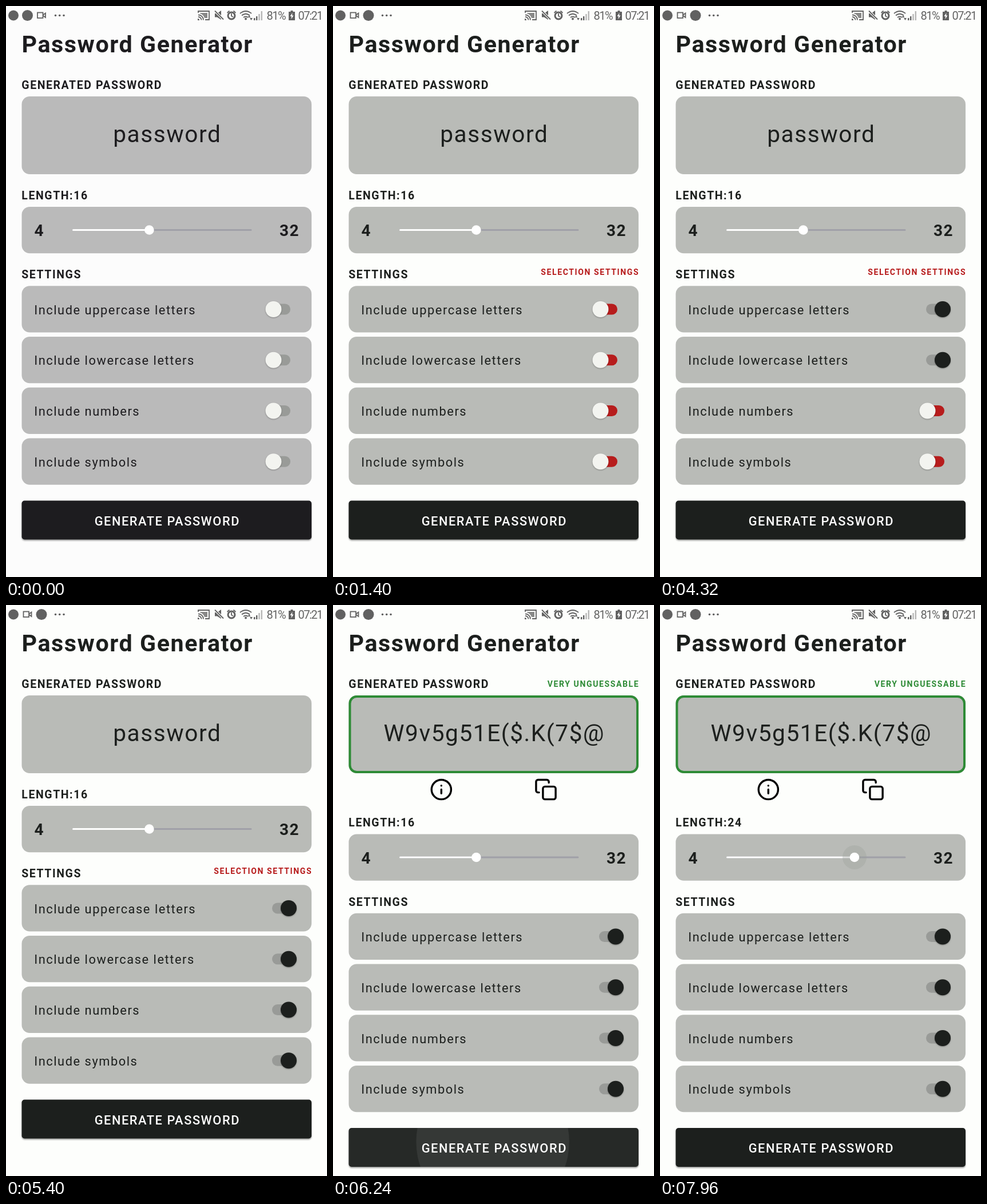
Write an HTML page that moves like this. It is 561x998 px and loops after 8 s.

```html
<!DOCTYPE html>
<html lang="en">
<head>
<meta charset="utf-8">
<title>Password Generator</title>
<style>
  html, body { margin: 0; width: 100%; height: 100%; overflow: hidden; background: #fdfefc; }
  svg { display: block; width: 100vw; height: 100vh; font-family: Roboto, "Liberation Sans", sans-serif; }
  text { fill: var(--ink); letter-spacing: 1.56px; white-space: pre; }
  .page { fill: var(--page); }
  .card { fill: var(--card); }
  .title { font-size: 41.2px; font-weight: 700; }
  .value { font-size: 40.6px; text-anchor: middle; }
  .head { font-size: 19.5px; font-weight: 700; }
  .note { font-size: 14.1px; font-weight: 700; text-anchor: end; }
  .limit { font-size: 28px; font-weight: 700; }
  .option { font-size: 21.8px; }
  .action { font-size: 21.8px; font-weight: 500; fill: #fff; text-anchor: middle; }
  .clock { font-size: 20px; letter-spacing: -1.5px; fill: #636363; }
  .line { fill: none; stroke: #000; stroke-width: 2; stroke-linecap: round; stroke-linejoin: round; }
  .status { fill: #616161; stroke: none; }
  .status .thin { fill: none; stroke: #616161; stroke-width: 1.8; }
  .raised { filter: drop-shadow(0 2px 1.3px rgba(0, 0, 0, .36)); }
  .thumb { filter: drop-shadow(0 1.5px 1px rgba(0, 0, 0, .3)); }
</style>
</head>
<body>
<svg id="stage" viewBox="0 0 561 998" preserveAspectRatio="none">
  <defs>
    <clipPath id="buttonClip"><rect x="27.5" y="864.6" width="506.5" height="67.8" rx="5"/></clipPath>
  </defs>
  <rect class="page" width="561" height="998"/>

  <g class="status">
    <circle cx="13" cy="16.5" r="9"/>
    <circle id="badge" cy="16.5" r="9.5"/>
    <g id="camera">
      <rect class="thin" x="-7" y="11.5" width="9.5" height="9.5"/>
      <path class="thin" d="M3 15.5L7 12.5V20L3 17"/>
    </g>
    <circle cx="86.5" cy="16.5" r="1.8"/><circle cx="93.7" cy="16.5" r="1.8"/><circle cx="101" cy="16.5" r="1.8"/>

    <path class="thin" d="M336 12V9H355V24H348"/>
    <path d="M339 12H352V21H347Q345 15 339 13Z" opacity=".75"/>
    <path class="thin" d="M336 15.5A9 9 0 0 1 345 24.5M336 19A5.5 5.5 0 0 1 341.5 24.5"/>
    <path d="M335 22A3 3 0 0 1 338 25H335Z"/>

    <path d="M365 13H369L376 8V24L369 19.5H365Z"/>
    <path d="M365 8.500L380 23.500" stroke="#fdfefc" stroke-width="4"/>
    <path class="thin" d="M365 8.500L380 23.500"/>

    <circle class="thin" cx="394" cy="17" r="6" style="stroke-width:3"/>
    <path class="thin" d="M394 13V17.5L397 19M386.5 12L390.5 8.5M401.5 12L397.5 8.5"/>

    <path class="thin" d="M409 13Q419 5 429 13M412 16.5Q419 11 426 16.5M415 20Q419 17 423 20"/>
    <circle cx="419" cy="22.5" r="2"/>
    <path d="M422.5 20L425 16.5L427.5 20ZM426 21H431L428.5 25Z"/>
    <path d="M433 21h2.4v4h-2.4zM437 18h2.4v7h-2.4z"/>
    <path d="M441.3 14h2.4v11h-2.4zM445.6 9h2.4v16h-2.4z" opacity=".45"/>

    <path d="M497.5 8H501.5V10H505V25H494V10H497.5Z"/>
    <path d="M500.5 12L496.5 18H499L498.5 23L502.5 16.5H500Z" fill="#fff"/>
    <text class="clock" x="455.500" y="24.200">81%</text>
    <text class="clock" x="510.500" y="24.200">07:21</text>
  </g>

  <text class="title" x="27.5" y="80.6">Password Generator</text>
  <text class="head" x="27.3" y="144.8">GENERATED PASSWORD</text>
  <rect class="card" x="27.5" y="158" width="506.5" height="136" rx="14"/>
  <text class="value" id="value" x="281.8" y="237.5"></text>

  <g id="rated">
    <text class="note" x="535.2" y="142.8" style="fill:#2e8b36">VERY UNGUESSABLE</text>
    <rect x="29.5" y="160" width="502.5" height="132" rx="12" fill="none" stroke="#2e8b36" stroke-width="4"/>
    <g class="line" transform="translate(168.8 302) scale(1.71)">
      <circle cx="12" cy="12" r="10"/><path d="M12 16V12M12 8h.01"/>
    </g>
    <g class="line" transform="translate(351.5 302) scale(1.71)">
      <rect x="9" y="9" width="13" height="13" rx="2"/>
      <path d="M5 15H4a2 2 0 0 1-2-2V4a2 2 0 0 1 2-2h9a2 2 0 0 1 2 2v1"/>
    </g>
  </g>

  <g id="lower">
    <text class="head" id="length" x="27.3" y="337.8"></text>
    <rect class="card" x="27.5" y="351" width="506.5" height="81.3" rx="14"/>
    <text class="limit" x="49.5" y="402">4</text>
    <text class="limit" x="478" y="402">32</text>
    <rect x="116" y="390" width="313.5" height="3" rx="1.5" fill="#a0a0a8"/>
    <rect id="filled" x="116" y="390" height="3" rx="1.5" fill="#fff"/>
    <circle id="halo" cy="391.5" r="21" fill="#9aa09a" opacity=".32"/>
    <circle id="knob" cy="391.5" r="8.3" fill="#fff"/>

    <text class="head" x="27.3" y="476">SETTINGS</text>
    <text class="note" id="error" x="535.2" y="469.5" style="fill:#b71c1c">SELECTION SETTINGS</text>
    <g id="options"></g>

    <rect class="raised" x="27.5" y="864.6" width="506.5" height="67.8" rx="5" style="fill:var(--ink)"/>
    <g clip-path="url(#buttonClip)" fill="#fff">
      <rect id="pressed" x="27.5" y="864" width="506.5" height="69"/>
      <circle id="ripple"/>
    </g>
    <text class="action" x="281.8" y="907.6">GENERATE PASSWORD</text>
  </g>
</svg>

<script>
const LOOP = 8000;
const FAILED = 400, SWAPPED = 1400, GENERATED = 6000, RATED = 6080, DRAGGED = 7600;
const PRESSES = [
  { down: 240, wave: 375, x: 209, y: 878 },
  { down: 5840, wave: 6005, x: 277, y: 877 }
];
const OPTIONS = [
  { name: 'uppercase letters', toggled: 2400 },
  { name: 'lowercase letters', toggled: 3960 },
  { name: 'numbers', toggled: 4440 },
  { name: 'symbols', toggled: 4960 }
];

const $ = id => document.getElementById(id);
const clamp = x => Math.min(1, Math.max(0, x));
const phase = (t, start, length) => clamp((t - start) / length);
const smooth = x => x * x * (3 - 2 * x);
const mix = (a, b, x) => a + (b - a) * x;
const show = (id, on) => $(id).setAttribute('visibility', on ? 'visible' : 'hidden');
const set = (el, attrs) => {
  for (const key in attrs) el.setAttribute(key, attrs[key]);
};

$('options').innerHTML = OPTIONS.map(({ name }, i) => `
  <g transform="translate(0 ${i * 88.75})">
    <rect class="card" x="27.5" y="489.2" width="506.5" height="81.3" rx="14"/>
    <text class="option" x="49.2" y="538.6">Include ${name}</text>
    <rect class="track" x="465" y="520.5" width="32" height="19" rx="9.5"/>
    <circle class="thumb" cy="530" r="14"/>
  </g>`).join('');
const tracks = document.querySelectorAll('.track');
const thumbs = document.querySelectorAll('.thumb');

function drawPalette(t) {
  const style = $('stage').style, first = t < 240;
  style.setProperty('--page', first ? '#fcfcfc' : '#fdfefc');
  style.setProperty('--card', first ? '#bababa' : '#b9bbb7');
  style.setProperty('--ink', first ? '#1d1c1f' : '#1c1f1d');
}

function drawSwitches(t) {
  const failed = t >= FAILED && t < GENERATED;
  OPTIONS.forEach(({ toggled }, i) => {
    const on = smooth(phase(t, toggled, 250));
    const red = i === 0 && t < 1080 ? '#d32f2f' : '#b71c1c';
    set(tracks[i], { fill: failed && t < toggled ? red : '#999b98' });
    set(thumbs[i], { cx: mix(467.5, 494, on), fill: t < toggled ? '#f3f4f0' : '#1c1f1d' });
  });
  show('error', failed);
}

function drawSlider(t) {
  const length = Math.round(mix(16, 24, phase(t, DRAGGED + 40, 300)));
  const x = mix(116, 429.5, (length - 4) / 28);
  $('length').textContent = 'LENGTH:' + length;
  set($('filled'), { width: x - 116 });
  set($('knob'), { cx: x });
  set($('halo'), { cx: x, r: 21 * phase(t, DRAGGED - 40, 120) });
}

function drawPress(t) {
  const { down, wave, x, y } = PRESSES[t < PRESSES[1].down ? 0 : 1];
  const grow = phase(t, wave, 450);
  const fade = 1 - phase(t, wave + 300, 350);
  set($('pressed'), { opacity: .045 * phase(t, down, 120) * fade });
  set($('ripple'), {
    cx: mix(x, 281, grow),
    cy: mix(y, 899, grow),
    r: 255 * grow,
    opacity: mix(.19, .07, clamp(grow * 2)) * fade
  });
}

function draw(t) {
  drawPalette(t);
  set($('badge'), { cx: t < SWAPPED ? 37.5 : 62 });
  set($('camera'), { transform: `translate(${t < SWAPPED ? 62 : 37.5} 0)` });
  $('value').textContent = t < GENERATED ? 'password' : 'W9v5g51E($.K(7$@';
  show('rated', t >= RATED);
  const shift = t < GENERATED ? 0 : t < RATED ? 33.3 : 49.5;
  set($('lower'), { transform: `translate(0 ${shift})` });
  drawSwitches(t);
  drawSlider(t);
  drawPress(t);
}

const start = performance.now();
function tick() {
  draw((performance.now() - start) % LOOP);
  requestAnimationFrame(tick);
}
tick();
</script>
</body>
</html>
```
